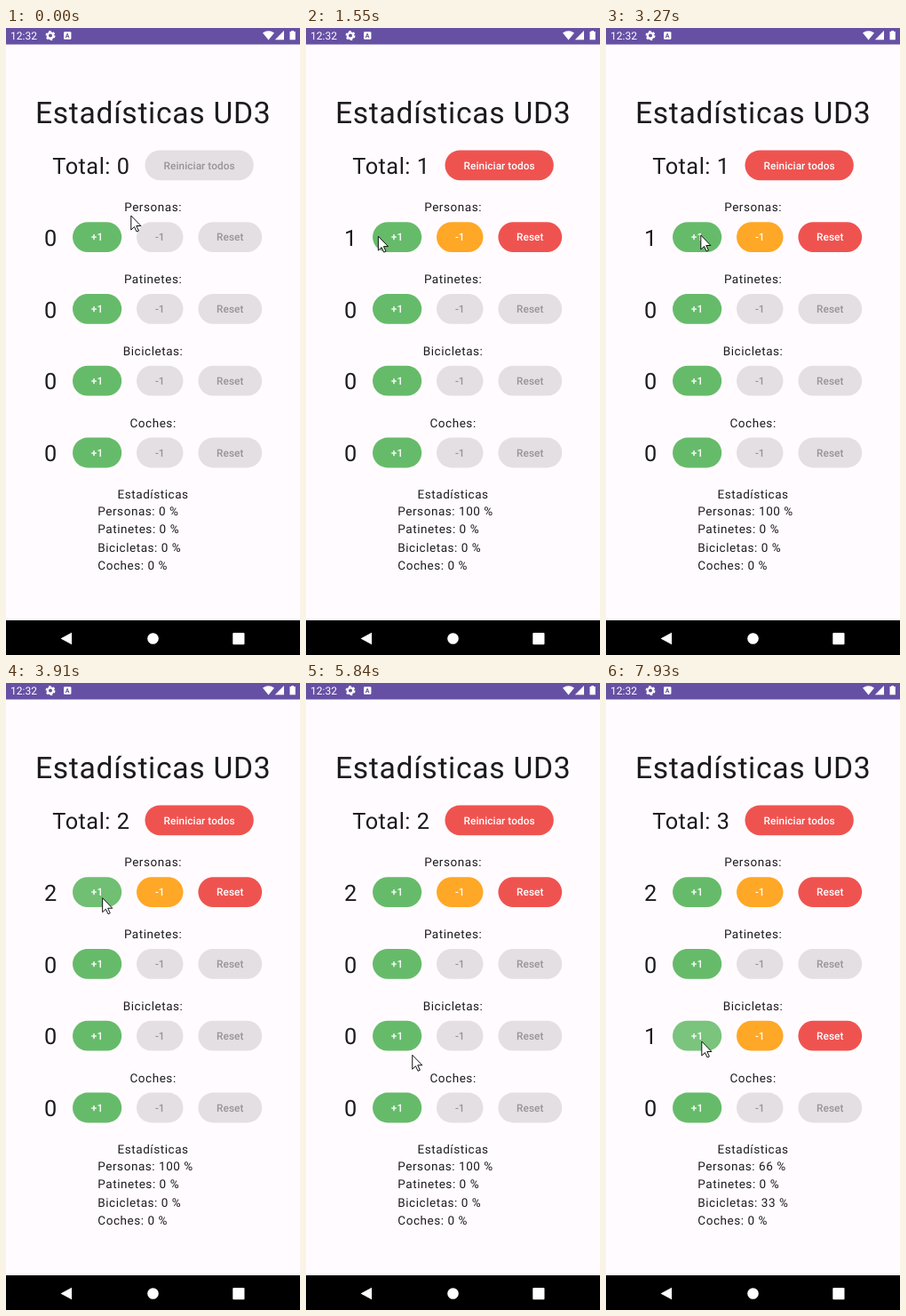
An HTML page for the animation above (8000 ms loop, 331x705 px).

```html
<!DOCTYPE html>
<html lang="es">
<head>
<meta charset="utf-8">
<style>
  html, body { margin: 0; width: 100%; height: 100%; overflow: hidden; background: #fffbfe; }
  svg { display: block; width: 331px; height: 705px; font-family: Roboto, sans-serif; text-rendering: geometricPrecision; }
  text { fill: #1c1b1f; white-space: pre; }
  .title { font-size: 33.7px; letter-spacing: .7px; }
  .big { font-size: 25.3px; letter-spacing: .5px; }
  .body { font-size: 13.5px; letter-spacing: .55px; }
  .label { font-size: 11.8px; font-weight: 500; letter-spacing: .08px; }
  .mid, .label { text-anchor: middle; }
  .status { font-size: 12px; fill: #fff; }
  .badge { font-size: 7px; font-weight: 700; fill: #6650a4; }
</style>
</head>
<body>
<svg id="stage" viewBox="0 0 331 705">
  <rect width="331" height="705" fill="#fffbfe"/>
  <rect width="331" height="18.5" fill="#6650a4"/>
  <text x="5" y="13" class="status">12:32</text>
  <g fill="#fff">
    <g fill="none" stroke="#fff">
      <circle cx="50" cy="8.6" r="3.2" stroke-width="2.4"/>
      <circle cx="50" cy="8.6" r="4.7" stroke-width="1.6" stroke-dasharray="2.5 2.42"/>
    </g>
    <rect x="65" y="4.3" width="8.4" height="8.4" rx="1"/>
    <path d="M289 5.6Q295.5 .8 302 5.6L295.5 13.4Z"/>
    <path d="M302.8 13.2H313V3Z"/>
    <path d="M319.5 4H321.3V3H324V4H325.8V13.3H319.5Z"/>
  </g>
  <text x="69.2" y="11.2" class="badge mid">A</text>
  <rect y="666" width="331" height="39"/>
  <g fill="#fff">
    <path d="M61.5 686.5L74 679.7V693.3Z"/>
    <circle cx="165.5" cy="686.5" r="6.3"/>
    <rect x="255.3" y="680" width="13.2" height="13.2" rx="1"/>
  </g>
</svg>
<script>
const stage = document.getElementById('stage');
const LOOP = 8000, GREEN = '#66bb6a', ORANGE = '#ffa726', RED = '#ef5350';
const NAMES = ['Personas', 'Patinetes', 'Bicicletas', 'Coches'];

// "+1" clicks: row and release time; each is held down equally long
const CLICKS = [{ row: 0, up: 1080 }, { row: 0, up: 3840 }, { row: 2, up: 6930 }, { row: 2, up: LOOP }];
const HOLD = 290, RIPPLE_IN = 60, RIPPLE_OUT = 140;

// Pointer strokes: eased moves to a point, optionally bowed out sideways
const HOME = [140, 210];
const STROKES = [
  { at: 50, time: 770, to: [81, 233] },
  { at: 1550, time: 760, to: [133, 226], bow: [-104, 31] },
  { at: 2310, time: 900, to: [106, 232], bow: [195, -61] },
  { at: 3840, time: 750, to: [180, 579] },
  { at: 4600, time: 820, to: [168, 546], bow: [22, 0] },
  { at: 5420, time: 540, to: [112, 399] },
  { at: 6210, time: 310, to: [107, 399], bow: [-14, -12] },
  { at: 7620, time: 180, to: [107, 402] }
];

function add(tag, attrs, content = '') {
  const node = document.createElementNS('http://www.w3.org/2000/svg', tag);
  for (const key in attrs) node.setAttribute(key, attrs[key]);
  node.textContent = content;
  stage.append(node);
  return node;
}

const text = (cls, x, y, content) => add('text', { class: cls, x, y }, content);

function button(x, y, width, caption, color) {
  const shape = { x, y, width, height: 33.8, rx: 16.9 };
  const box = add('rect', shape);
  const label = text('label', x + width / 2, y + 21.1, caption);
  const ripple = add('rect', { ...shape, fill: '#fff' });
  return {
    enable(on) {
      box.style.fill = on ? color : '#e3dfe3';
      label.style.fill = on ? '#fff' : '#979498';
    },
    press(amount) { ripple.style.opacity = .13 * amount; }
  };
}

text('title', 32.9, 107.4, 'Estadísticas UD3');
const total = text('big', 52.3, 164.4);
const resetAll = button(156.5, 137.4, 122.3, 'Reiniciar todos', RED);
resetAll.press(0);

const rows = NAMES.map((name, i) => {
  const y = 218.2 + 80.8 * i;
  text('body mid', 165.6, y - 12, name + ':');
  const row = {
    count: text('big', 43.1, y + 26.6),
    plus: button(75, y, 55.2, '+1', GREEN),
    minus: button(147, y, 52.5, '-1', ORANGE),
    reset: button(216.4, y, 71.8, 'Reset', RED),
    share: text('body', 103.3, 548 + 20.4 * i)
  };
  row.plus.enable(true);
  row.minus.press(0);
  row.reset.press(0);
  return row;
});
text('body mid', 165.6, 529.3, 'Estadísticas');

const pointer = add('path', {
  d: 'M.8 1V17L4.5 13.5L7.1 19L9.4 18L6.8 12.5H11.9Z',
  fill: '#fff', stroke: '#111', 'stroke-linejoin': 'round'
});

const clamp = v => Math.max(0, Math.min(1, v));

function pointerAt(t) {
  return STROKES.reduce((from, { at, time, to, bow = [0, 0] }) => {
    const p = clamp((t - at) / time), ease = p * p * (3 - 2 * p);
    return from.map((v, k) => v + (to[k] - v) * ease + bow[k] * Math.sin(Math.PI * p));
  }, HOME);
}

function ripple(t, up) {
  return clamp((t - up + HOLD) / RIPPLE_IN) * clamp((up + RIPPLE_OUT - t) / RIPPLE_OUT);
}

function render(t) {
  const counts = NAMES.map((_, i) => CLICKS.filter(c => c.row === i && t >= c.up).length);
  const sum = counts.reduce((a, b) => a + b);
  total.textContent = 'Total: ' + sum;
  resetAll.enable(sum > 0);
  rows.forEach((row, i) => {
    const n = counts[i], clicks = CLICKS.filter(c => c.row === i);
    row.count.textContent = n;
    row.share.textContent = `${NAMES[i]}: ${sum ? Math.floor(100 * n / sum) : 0} %`;
    row.minus.enable(n > 0);
    row.reset.enable(n > 0);
    row.plus.press(Math.max(0, ...clicks.map(c => ripple(t, c.up))));
  });
  pointer.setAttribute('transform', `translate(${pointerAt(t)})`);
}

const start = performance.now();
function tick() {
  render((performance.now() - start) % LOOP);
  requestAnimationFrame(tick);
}
tick();
</script>
</body>
</html>
```
